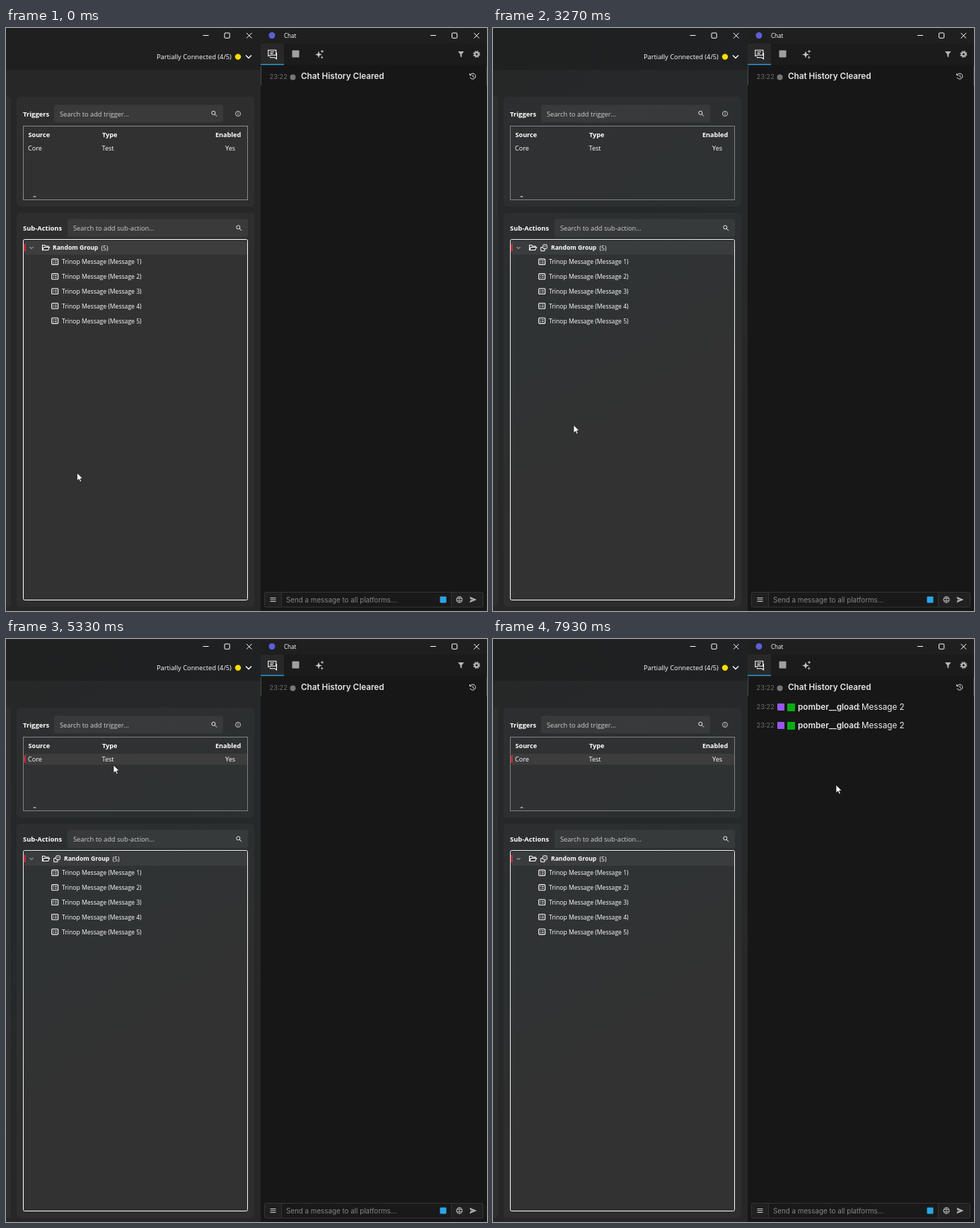
An HTML page that plays this animation: 680x823 px, repeating every 8 s.

```html
<!DOCTYPE html>
<html lang="en">
<head>
<meta charset="utf-8">
<title>Random group</title>
<style>
html, body { margin: 0; width: 100%; height: 100%; overflow: hidden; background: #171717; }
#stage { display: block; width: 100vw; height: 100vh; }
text { font: 9.3px "Open Sans", "Noto Sans", sans-serif; fill: #fff; white-space: pre; }
.b { font-weight: 700; font-size: 9.4px; }
.cell { font-size: 9.1px; }
.head { font-size: 9.1px; font-weight: 700; }
.item { font-size: 8.6px; }
.group { font-size: 8.6px; font-weight: 700; }
.hint { fill: #cfcfcf; }
.off { fill: #9a9a9a; }
.win { font-size: 8.1px; }
.chat { font: 11.7px Inter, "Open Sans", sans-serif; fill: #eee; }
.user { font: 600 11.7px Inter, "Open Sans", sans-serif; fill: #e8e8e8; }
.time { font: 9.3px Inter, "Open Sans", sans-serif; fill: #6c6c6c; }
.send { font: 9.8px Inter, "Open Sans", sans-serif; fill: #858585; }
</style>
</head>
<body>
<svg id="stage" viewBox="0 0 680 823" preserveAspectRatio="none"></svg>
<script>
const text = (x, y, s, cls = '') => `<text x="${x}" y="${y + 3.3}" class="${cls}">${s}</text>`;
const rect = (x, y, w, h, fill, r = 0, more = '') =>
  `<rect x="${x}" y="${y}" width="${w}" height="${h}" rx="${r}" fill="${fill}" ${more}/>`;
const line = (d, color = '#fff', w = 1) => `<path d="${d}" fill="none" stroke="${color}" stroke-width="${w}"/>`;
const shape = (d, fill) => `<path d="${d}" fill="${fill}"/>`;
const dot = (x, y, r, fill, more = '') => `<circle cx="${x}" cy="${y}" r="${r}" fill="${fill}" ${more}/>`;
const stroke = (c, w = 1) => `stroke="${c}" stroke-width="${w}"`;
const layer = (id, body) => `<g id="${id}">${body}</g>`;

const windowButtons = x =>
  line(`M${x} 10.5h8`) + rect(x + 30.5, 7, 7.2, 7.2, 'none', 1, stroke('#fff')) +
  line(`M${x + 61.5} 7l7.5 7.5m0-7.5l-7.5 7.5`);
const lens = (x, y) => dot(x - .7, y - .7, 2.5, 'none', stroke('#eee')) + line(`M${x + 1.1} ${y + 1.1}l3 3`, '#eee');
const star4 = (x, y, r, c) => {
  const k = r * .25;
  return shape(`M${x} ${y - r}l${k} ${r - k} ${r - k} ${k} ${k - r} ${k} ${-k} ${r - k} ${-k} ${k - r} ${k - r} ${-k} ${r - k} ${-k}z`, c);
};
const folder = line('M51.5 313.5V306.5h3.2l1.3 1.5h4v1.5M51.5 313.5l2-4h8l-2 4z', '#fff', 1.1);
const dice = rect(70.7, 306, 5.6, 5.6, 'none', 1, stroke('#fff')) +
  line('M70.5 309.5H67.7v5.2h5.3v-3', '#fff') + dot(73.5, 308.8, .7, '#fff');

const listItem = n => {
  const y = 309.2 + 20.8 * n;
  return rect(64.7, y - 3.9, 9, 7.8, 'none', 1, stroke('#fff', 1.1)) +
    line(`M66.5 ${y - 1.3}h1.4m1 0h3M66.5 ${y + 1.2}h1.4m1 0h3`, '#fff', .9) +
    text(79, y, `Trinop Message (Message ${n})`, 'item');
};

const message = y => text(372.5, y, '23:22', 'time') +
  rect(402, y - 5, 10, 10, '#9a55ee', 1) + rect(416, y - 5, 11, 11, '#05ad14', 1) +
  text(431, y + .6, 'pomber__gload', 'user') + text(516, y + .6, ':', 'chat') + text(521, y + .6, 'Message 2', 'chat');

const main = () =>
  rect(0, 0, 360, 823, '#1f1f1f') + rect(0, 59, 360, 764, '#272727') +
  rect(-6, 97, 13, 720, '#2e2e2e', 4) +
  rect(15, 97, 336, 155, '#2e2e2e', 5) + rect(15, 261, 336, 556, '#2e2e2e', 5) +
  rect(68, 108.5, 239, 24.5, '#3a3a3a', 3) + rect(87, 269.5, 255, 25.5, '#3a3a3a', 3) +
  rect(24.5, 138.5, 317, 104, '#313131', 0, stroke('#8a8a8a')) +
  rect(24.5, 298.5, 317, 509, '#323232', 2, stroke('#fff')) +
  rect(26, 301, 315, 19, '#3d3d3d', 2) +
  layer('tint', rect(0, 0, 360, 823, 'url(#mica)')) +
  windowButtons(278.5) +
  text(213, 41, 'Partially Connected (4/5)') + dot(328, 40.6, 4.2, '#ffdd00') +
  line('M339 38.5l4 4 4-4', '#fff', 1.4) +
  text(24, 121.5, 'Triggers', 'b') + text(76, 122, 'Search to add trigger...', 'hint') + lens(294, 120.5) +
  dot(328, 121, 3.5, 'none', stroke('#ddd', .9)) + line('M328 120.3v2.4m0-4v.9', '#ddd', .9) +
  text(31.5, 150.5, 'Source', 'head') + text(136, 150.5, 'Type', 'head') + text(296, 150.5, 'Enabled', 'head') +
  layer('row', rect(26, 162, 315, 15.5, '#3d3d3d', 2)) +
  layer('mark', rect(25.5, 164, 2, 11, '#e8283c', 1)) +
  text(31, 170, 'Core', 'cell') + text(135.5, 170, 'Test', 'cell') + text(310, 170, 'Yes', 'cell') +
  rect(38.5, 237, 4, 2, '#999', 1) +
  text(24, 282.5, 'Sub-Actions', 'b') + text(95, 283, 'Search to add sub-action...', 'hint') + lens(329, 282) +
  rect(25.5, 304.5, 2, 11, '#e8283c', 1) + line('M33.5 309l2.5 2.5 2.5-2.5', '#ccc') + folder +
  layer('dice', dice) +
  layer('group', text(66, 310, 'Random Group', 'group') + text(134.5, 310.5, '(5)', 'item')) +
  [1, 2, 3, 4, 5].map(listItem).join('');

const chat = () =>
  rect(360, 0, 320, 823, '#171717') + rect(360, 0, 320, 22, '#1f1f1f') + rect(360, 22, 320, 30, '#1b1b1b') +
  rect(360, 22, 33, 30, '#282828') + rect(360, 50.8, 33, 1.4, '#2ba3dc') +
  dot(376, 10.5, 4.5, '#5b5fd6') + text(393, 10.5, 'Chat', 'win') + windowButtons(600) +
  line('M370.8 39.5v-8.2h11v7h-7.5zM373.5 40.5v1.2h6.5l2.5 2V35M373.5 33.8h5.5m-5.5 2.3h4', '#fff', 1.1) +
  rect(404.5, 31.5, 10, 10, '#a0a0a0', 1) +
  star4(442, 37.5, 5, '#c8c8c8') + star4(447, 33, 2.6, '#c8c8c8') + star4(446.7, 41.5, 2.4, '#c8c8c8') +
  shape('M639 33h8.5l-3.2 4.2v4.3l-2.1-1.4v-2.9z', '#b5b5b5') +
  dot(665.3, 37, 2.6, 'none', stroke('#b5b5b5', 2.1)) +
  dot(665.3, 37, 4.2, 'none', stroke('#b5b5b5', 1.5) + ' stroke-dasharray="1.9 1.4"') +
  rect(360, 54, 1, 27, '#4c4c4c') + rect(679, 54, 1, 27, '#3a3a3a') +
  text(372.5, 68.5, '23:22', 'time') + dot(405.5, 69.5, 4, '#777') +
  text(417, 68.5, 'Chat History Cleared', 'user') +
  line('M656.3 66.2a4 4 0 1 1-.2 3.4M655.6 64v2.6h2.6M660 66v2.7l1.9 1', '#ddd') +
  layer('msg1', message(96)) + layer('msg2', message(122)) +
  rect(365.5, 796.5, 309, 21, '#202020', 2, stroke('#343434')) + rect(389, 797, 240, 20, '#191919') +
  line('M389.5 797v20M629.5 797v20', '#343434') +
  line('M373.5 804.5h8m-8 2.5h8m-8 2.5h8', '#ccc', 1.1) +
  text(396, 807.2, 'Send a message to all platforms...', 'send') + rect(613.5, 802.5, 9, 9, '#2aa5e6', 1) +
  dot(641, 807, 4, 'none', stroke('#aaa', 1.3)) + line('M637 805.5h8m-8 3h8M641 803v8', '#aaa') +
  shape('M655.5 802.7l10 4.3-10 4.3 1-3.6 4.5-.7-4.5-.7z', '#b5b5b5');

// Menu rows: [centre y, label, kind]; a row with no label is a separator.
const groupRows = [[14.5, 'Random Group', 'off'], [41.5, 'Add Group'], [64, 'Edit Group'], [87, 'Copy Group'],
  [109, 'Copy Group Contents'], [132, 'Paste Sub-Action(s)'], [154.7, 'Paste Into Group'], [177, 'Duplicate Group'],
  [200, 'Delete Group'], [222.7, 'Clear Child SubActions'], [236], [248.5, 'Random', 'box'], [272.5, 'Enabled', 'check'],
  [296, 'Move'], [309], [322, 'Delete All SubActions'], [334.5], [348, 'Favorite Sub-Actions'],
  [371.5, 'Recent Sub-Actions', 'sub'], [385.5], [399.5, 'Add', 'sub']];
const triggerRows = [[14.5, 'Test Trigger'], [27.5], [40.7, 'Edit Trigger'], [63.3, 'Copy Trigger'], [86, 'Delete Trigger'],
  [98], [112.5, 'Favorite', 'star'], [138.5, 'Enabled', 'check'], [151.5], [165.7, 'Refresh All Triggers'],
  [188.3, 'Clear All Triggers'], [211, 'Enable All Triggers'], [233.7, 'Disable All Triggers'], [246.5],
  [260, 'Favorite Triggers'], [283, 'Recent Triggers', 'sub'], [296.5], [310.7, 'Add', 'sub']];
const menus = [
  { x: 95, y: 308, w: 126, h: 413, open: 1250, close: 3090, rows: groupRows },
  { x: 136, y: 168, w: 107.5, h: 324.5, open: 4480, close: 4890, rows: triggerRows },
  { x: 158.7, y: 168, w: 107.5, h: 324.5, open: 7285, close: 7630, rows: triggerRows }];

const menuRow = w => ([y, label, kind]) => {
  if (!label) return rect(0, y, w, 1, '#383838');
  let out = '';
  if (kind == 'box' || kind == 'check') out += rect(9.5, y - 6.3, 12.6, 12.6, '#262626', 2.5, stroke('#a0a0a0'));
  if (kind == 'check') out += line(`M12.5 ${y}l2.5 2.6 4.5-5`);
  if (kind == 'star')
    out += line(`M17.5 ${y - 5.5}l1.7 3.7 4 .5-3 2.7.8 4-3.5-2-3.5 2 .8-4-3-2.7 4-.5z`);
  if (kind == 'sub') out += line(`M${w - 15} ${y - 2.8}l2.8 2.8-2.8 2.8`, '#ccc');
  const x = { box: 27, check: 27, star: 30, sub: 10 }[kind] || 9;
  return out + text(x, y, label, kind == 'off' ? 'off' : '');
};
const menu = (m, i) => `<svg id="menu${i}" x="${m.x}" y="${m.y}" width="${m.w}" height="${m.h}"><g>` +
  rect(.25, .25, m.w - .5, m.h - .5, '#2b2b2b', 5, stroke('#262626', .5)) +
  rect(3, 0, m.w - 6, 23, '#363636', 3) + m.rows.map(menuRow(m.w)).join('') + '</g></svg>';

const stage = document.getElementById('stage');
stage.innerHTML = `<defs><linearGradient id="mica" x2=".3" y2="1">
  <stop stop-color="#1a3540" stop-opacity=".03"/><stop offset=".55" stop-color="#1a3c48" stop-opacity=".11"/>
  <stop offset=".85" stop-color="#303030" stop-opacity="0"/></linearGradient></defs>` +
  main() + chat() + menus.map(menu).join('') +
  `<path id="cursor" d="M0 0V11.2L2.6 8.8 4.4 12.8 6.2 12 4.5 8.1H8Z" fill="#fff" stroke="#111" stroke-width=".7"/>`;

const path = [[70, 100.5, 628], [470, 133, 440], [800, 104, 288], [900, 95, 308.5], [1640, 95, 308.5],
  [2000, 112, 692], [2330, 108.5, 560], [2450, 108.5, 560], [2620, 116, 562], [2800, 114, 560.5], [3440, 114, 560.5],
  [4130, 133, 150], [4300, 136, 168], [4500, 136, 168], [4730, 152, 178], [5770, 152, 178], [6200, 533, 126.5],
  [6400, 556, 122], [6620, 550, 117.5], [7230, 160, 168], [7330, 167, 171], [7460, 172, 178], [7630, 172, 178],
  [7930, 485, 206], [8000, 489, 208]];
const clamp = v => Math.max(0, Math.min(1, v));

function cursorAt(t) {
  const i = path.findIndex(p => p[0] > t);
  if (i < 1) return path[i ? path.length - 1 : 0].slice(1);
  const [a, b] = [path[i - 1], path[i]];
  const k = (t - a[0]) / (b[0] - a[0]), e = k * k * (3 - 2 * k);
  return [a[1] + (b[1] - a[1]) * e, a[2] + (b[2] - a[2]) * e];
}

const $ = id => document.getElementById(id);
const show = (id, on) => $(id).style.display = on ? '' : 'none';

function drawMenu(m, i, t, cx, cy) {
  const age = t - m.open;
  const alpha = Math.min(clamp(age / 110), 1 - clamp((t - m.close) / 150));
  show('menu' + i, alpha > 0);
  if (!alpha) return;
  const el = $('menu' + i), body = el.firstChild, hover = body.children[1];
  const slide = age < 250 ? -47 * Math.exp(-age / 34) : 0;
  el.style.opacity = alpha;
  body.setAttribute('transform', `translate(0 ${slide})`);
  const row = m.rows.find(r => r[1] && r[2] != 'off' && Math.abs(r[0] + slide + m.y - cy) < 11.5);
  const inside = age > 120 && row && cx >= m.x && cx <= m.x + m.w;
  hover.style.display = inside ? '' : 'none';
  if (inside) hover.setAttribute('y', row[0] - 11.5);
}

function draw(t) {
  const [x, y] = cursorAt(t);
  $('cursor').setAttribute('transform', `translate(${x} ${y})`);
  $('tint').style.opacity = clamp((t - 930) / 200);
  const random = t >= 3180, picked = t >= 4470;
  show('dice', random);
  $('group').setAttribute('transform', `translate(${random ? 16 : 0} 0)`);
  show('mark', picked);
  show('row', picked || (x < 341 && y > 161 && y < 178));
  show('msg1', t >= 5590);
  show('msg2', t >= 7860);
  menus.forEach((m, i) => drawMenu(m, i, t, x, y));
}

const start = performance.now();
function tick() {
  draw((performance.now() - start) % 8000);
  requestAnimationFrame(tick);
}
tick();
</script>
</body>
</html>
```
